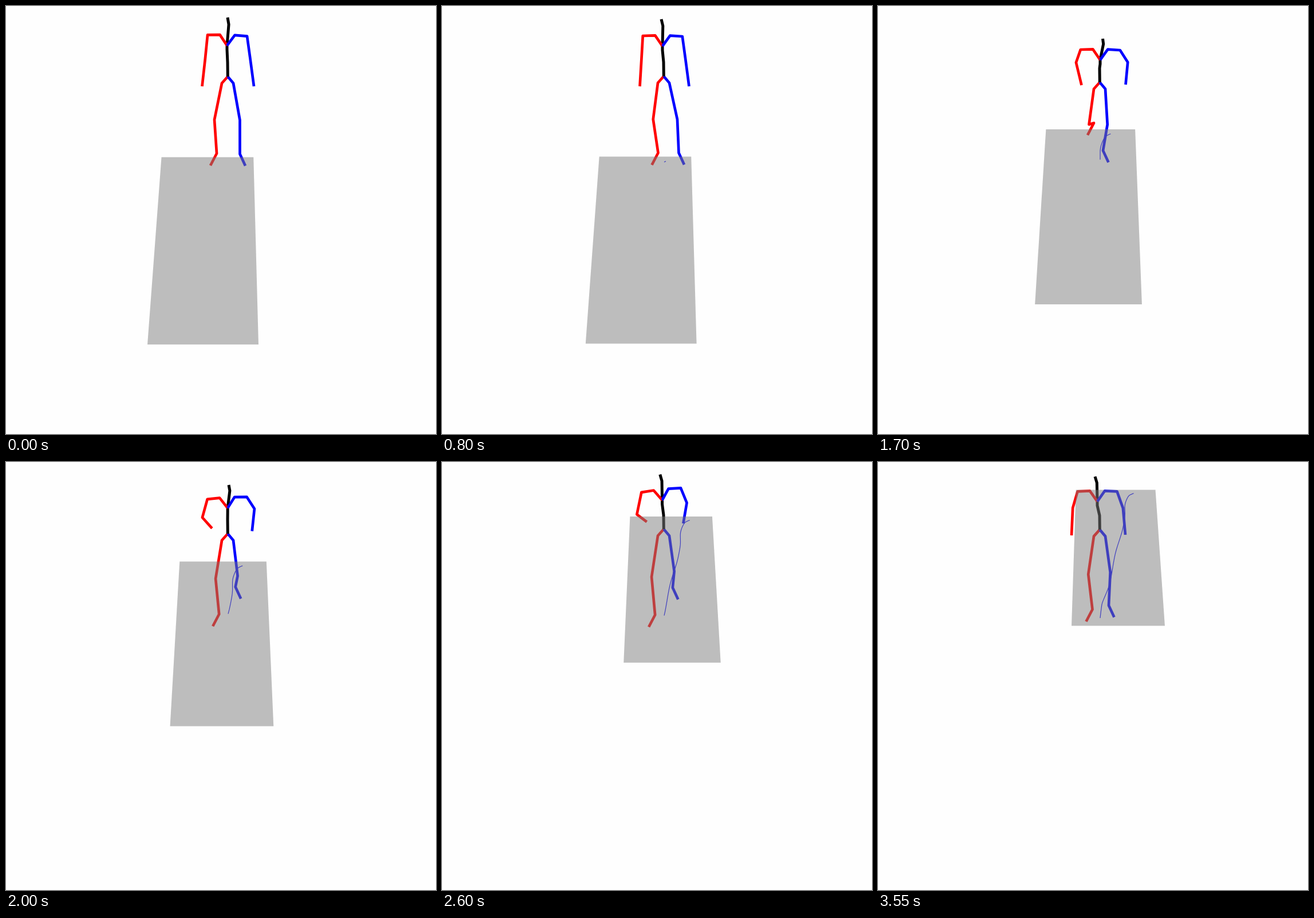
Recreate the animation shown at these times as an HTML page with a canvas. Size 751x746 px, loop 3600 ms.

```html
<!DOCTYPE html>
<html lang="en">
<head>
<meta charset="utf-8">
<title>Walking stick figure</title>
<style>
  html, body { margin: 0; width: 100%; height: 100%; overflow: hidden; background: #fefefe; }
  canvas { display: block; }
</style>
</head>
<body>
<canvas id="stage" width="751" height="746"></canvas>
<script>
const ctx = document.getElementById('stage').getContext('2d');
const LOOP = 3600, STEP = 50;

// Key points: time, then the values to ease between.
// Floor: centre x and y of its near edge.
const floorPath = [
  [0, 344, 590], [550, 345, 590], [800, 347.7, 588.5], [1100, 354.7, 583.5],
  [1250, 358.7, 577], [1550, 367.2, 543], [1700, 367.5, 520], [1930, 373.7, 475],
  [2250, 391.2, 408.5], [2620, 402.7, 347], [2950, 417, 308.5], [3550, 419.5, 285.5]
];
// Torso: pelvis y, chest x and y, head x and y, sine of the shoulder roll.
const torso = [
  [0, 123, 386, 69, 387, 20, -0.03],
  [800, 122.5, 385, 70, 383, 23, -0.015],
  [1250, 123, 382.5, 77, 377, 39, 0.147],
  [1700, 133, 388, 94, 392.5, 57, -0.015],
  [2250, 119, 386, 70, 385, 27, 0.11],
  [2950, 127, 383.5, 75, 378.5, 28.5, 0.1],
  [3550, 119, 383, 70, 379, 26.5, 0]
];
// Side -1 is red, 1 is blue. Arm: elbow drop below the shoulder, hand relative
// to the chest. Foot: ankle x and y. Bow: how far the knee points outwards.
const sides = [
  {
    side: -1, color: '#f00', bow: 8.5, toe: [-11, 21],
    arm: [
      [0, 41, -43.5, 71], [800, 39, -39.5, 70], [1250, 40, -34.5, 71], [1700, 22.5, -32.5, 44],
      [2250, 39, -24, 32], [2950, 37.5, -32.5, 47.5], [3550, 28.5, -45, 59]
    ],
    foot: [
      [0, 368, 257], [800, 377.5, 256], [1250, 387, 251], [1700, 377, 204], [1980, 372, 266],
      [2250, 383.5, 217.5], [2750, 369, 280], [2950, 375.5, 272], [3550, 374.5, 257]
    ]
  },
  {
    side: 1, color: '#00f', bow: 5.7, toe: [9.5, 20.5],
    arm: [
      [0, 38, 47, 71], [800, 39, 46.5, 70], [1250, 26, 49, 48], [1700, 21, 44.5, 43],
      [2250, 20.5, 41, 39], [2950, 31, 34, 44], [3550, 29, 49, 58]
    ],
    foot: [
      [0, 408.5, 258], [800, 413.5, 256], [1250, 400, 262], [1450, 394, 270], [1700, 393, 252],
      [1950, 401, 214], [2250, 397, 265], [2720, 404, 210], [2950, 402, 230.5], [3550, 403, 250]
    ]
  }
];

// Smooth interpolation without overshoot.
function sample(track, t) {
  const last = track.length - 1;
  let i = 0;
  while (i < last - 1 && t >= track[i + 1][0]) i++;
  const span = track[i + 1][0] - track[i][0];
  const u = Math.min(1, (t - track[i][0]) / span);
  const rate = (k, c) => (track[k + 1][c] - track[k][c]) / (track[k + 1][0] - track[k][0]);
  const slope = (k, c) => {
    if (k === 0 || k === last) return 0;
    const a = rate(k - 1, c), b = rate(k, c);
    return a * b <= 0 ? 0 : 2 * a * b / (a + b);
  };
  return track[i].slice(1).map((from, n) => {
    const c = n + 1, d = track[i + 1][c] - from;
    const m0 = slope(i, c) * span, m1 = slope(i + 1, c) * span;
    return from + u * (m0 + u * (3 * d - 2 * m0 - m1 + u * (m0 + m1 - 2 * d)));
  });
}

// Ground perspective: depth is the inverse of the distance below the horizon.
const HORIZON = -1315, VANISH_X = 390, DEPTH = 0.0001086, HALF = 0.0509;
const toGround = (x, y) => [(x - VANISH_X) / (y - HORIZON), 1 / (y - HORIZON)];
const toScreen = (gx, gz) => [VANISH_X + gx / gz, HORIZON + 1 / gz];
const floorAt = t => toGround(...sample(floorPath, t));
// The spot under the body rises a little in mid-walk.
const spotAt = t => toGround(388, 272 - 8 * Math.exp(-(((t - 2150) / 570) ** 2)));

function trace(points) {
  ctx.beginPath();
  points.forEach(([x, y]) => ctx.lineTo(x, y));
}

function line(points, color, width = 4.7) {
  trace(points);
  ctx.strokeStyle = color;
  ctx.lineWidth = width;
  ctx.stroke();
}

function drawTrail(t, [gx, gz]) {
  const points = [];
  for (let s = 0; s <= t; s += STEP) {
    const [px, pz] = floorAt(s), [sx, sz] = spotAt(s);
    points.push(toScreen(sx + gx - px, sz + gz - pz));
  }
  line(points, '#00f', 1.2);
}

function drawLeg(t, pelvis, { side, color, bow, toe, foot }) {
  const hip = [387 + 10 * side, pelvis[1] + 11.5];
  const [ax, ay] = sample(foot, t);
  const knee = [(hip[0] + ax) / 2 + bow * side, hip[1] + Math.max(62, 0.52 * (ay - hip[1]))];
  line([pelvis, hip, knee, [ax, ay], [ax + toe[0], ay + toe[1]]], color);
}

function drawArm(t, [cx, cy], roll, { side, color, arm }) {
  const level = Math.sqrt(1 - roll * roll);
  const tilt = (x, y) => [cx + x * level + y * roll, cy + y * level - x * roll];
  const shoulder = tilt(34.5 * side, -17.5);
  const [drop, hx, hy] = sample(arm, t);
  const hand = [cx + hx, cy + hy];
  // The shorter the arm looks, the more the elbow sticks out.
  const bend = Math.max(0, 88 - (hand[1] - shoulder[1])) * 0.33;
  const elbow = [shoulder[0] + 0.43 * (hand[0] - shoulder[0]) + bend * side, shoulder[1] + drop];
  line([[cx, cy], tilt(13 * side, -18.5), shoulder, elbow, hand], color);
}

function draw(t) {
  ctx.fillStyle = '#fefefe';
  ctx.fillRect(0, 0, 751, 746);
  const [gx, gz] = floorAt(t);
  drawTrail(t, [gx, gz]);

  const [hipY, cx, chestY, hx, headY, roll] = sample(torso, t);
  const bounce = 6 * Math.sin(Math.PI * Math.max(0, t - 2250) / 700) ** 2;
  const pelvis = [387.3, hipY - bounce], cy = chestY - bounce, hy = headY - bounce;
  const neck = [cx + 0.75 * (hx - cx) + 2.3, cy + 0.75 * (hy - cy)];

  sides.forEach(s => drawLeg(t, pelvis, s));
  line([[hx, hy], neck, [cx, cy], [cx, cy + 7], [387, pelvis[1] - 24.5], pelvis], '#000', 5);
  sides.forEach(s => drawArm(t, [cx, cy], roll, s));

  trace([
    toScreen(gx - HALF, gz + DEPTH), toScreen(gx + HALF, gz + DEPTH),
    toScreen(gx + HALF, gz), toScreen(gx - HALF, gz)
  ]);
  ctx.fillStyle = 'rgba(126, 126, 126, 0.5)';
  ctx.fill();
}

ctx.lineJoin = 'round';
const start = performance.now();
function tick() {
  const t = (performance.now() - start) % LOOP;
  draw(Math.floor(t / STEP) * STEP);
  requestAnimationFrame(tick);
}
tick();
</script>
</body>
</html>
```
